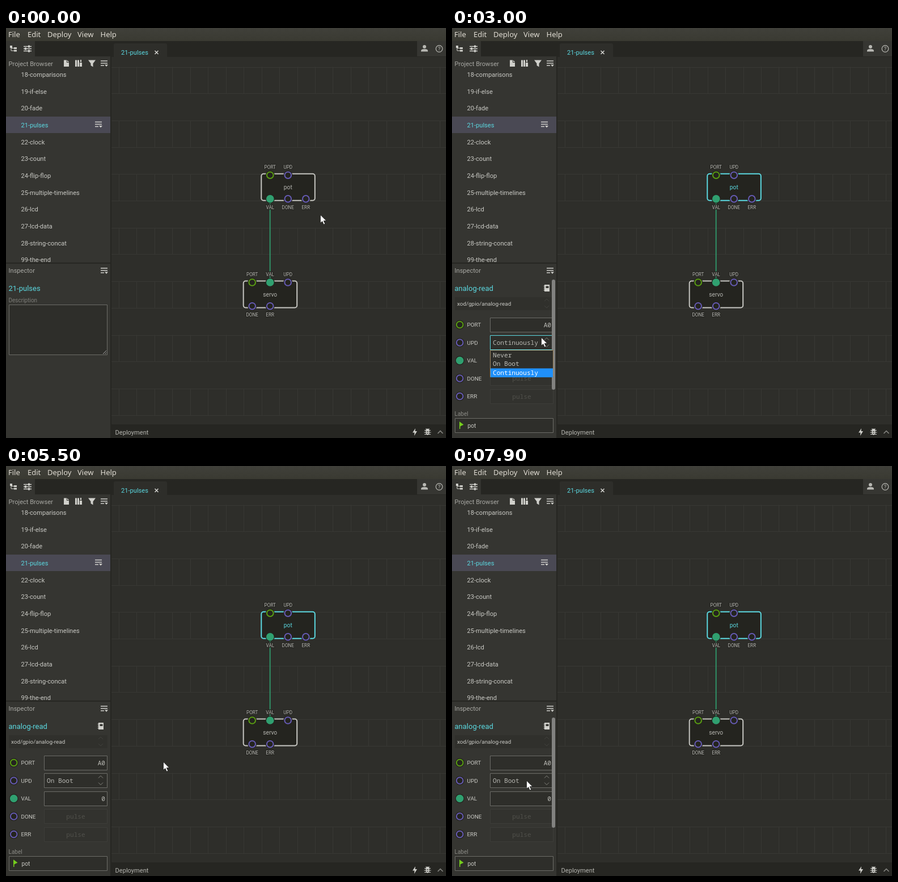
An HTML page with a canvas for the animation above (8 s loop, 776 by 722 pixels).

```html
<!DOCTYPE html>
<html lang="en">
<head>
<meta charset="utf-8">
<title>Patch editor</title>
<style>
  html, body { margin: 0; height: 100%; overflow: hidden; background: #2e2e2a; }
  canvas { display: block; }
</style>
</head>
<body>
<canvas id="stage" width="776" height="722"></canvas>
<script>
const c = document.getElementById('stage').getContext('2d');
const LOOP = 8000, STEP = 100;
const SANS = 'Roboto, sans-serif', MONO = '"Noto Sans Mono", monospace';
const CYAN = '#5bd8e0', GREEN = '#599d12', PURPLE = '#665bb4', TEAL = '#30a070';
const SIDE = '#353531', DARK = '#262622', BOARD = '#2e2e2a', NODE = '#24241f', TEXT = '#c9c9c4', ICON = '#d0d0cb';

// Pointer path: time, x, y
const path = [
  [100, 554, 329], [400, 544, 303], [700, 522, 267], [1500, 522, 267],
  [1600, 500, 285], [1700, 440, 259], [1800, 386, 270], [1900, 386, 270],
  [2000, 362, 310], [2100, 300, 420], [2200, 258, 496], [2300, 258, 496],
  [2800, 157, 545], [3500, 157, 545], [3700, 147, 571], [3800, 147, 571],
  [4000, 136, 581], [4100, 136, 581], [4200, 131, 585], [4800, 131, 585],
  [4900, 132, 580], [5000, 132, 580], [5300, 277, 521], [5900, 277, 521],
  [6400, 420, 342], [6500, 514, 289], [6700, 514, 289], [6800, 500, 272],
  [7200, 500, 272], [7900, 131, 554]
];

function pointerAt(t) {
  const i = path.findIndex(p => p[0] >= t);
  if (i <= 0) return path[0].slice(1);
  const [t0, x0, y0] = path[i - 1], [t1, x1, y1] = path[i];
  const k = (t - t0) / (t1 - t0);
  return [Math.round(x0 + (x1 - x0) * k), Math.round(y0 + (y1 - y0) * k)];
}

function rect(x, y, w, h, fill) {
  c.fillStyle = fill;
  c.fillRect(x, y, w, h);
}

function text(s, x, y, size = 11.1, color = TEXT, align = 'left', font = SANS, weight = 400) {
  c.font = `${weight} ${size}px ${font}`;
  c.textAlign = align;
  c.fillStyle = color;
  c.fillText(s, x, y);
}

function box(x, y, w, h, fill, stroke) {
  rect(x, y, w, h, fill);
  c.strokeStyle = stroke;
  c.lineWidth = 1;
  c.strokeRect(x + .5, y + .5, w - 1, h - 1);
}

function shape(d, x, y, fill, stroke, width = 1) {
  const p = new Path2D(d);
  c.save();
  c.translate(x, y);
  if (fill) { c.fillStyle = fill; c.fill(p); }
  if (stroke) { c.strokeStyle = stroke; c.lineWidth = width; c.stroke(p); }
  c.restore();
}

function disc(x, y, r, fill, stroke, width = 2) {
  c.beginPath();
  c.arc(x, y, r, 0, 7);
  if (fill) { c.fillStyle = fill; c.fill(); }
  if (stroke) { c.strokeStyle = stroke; c.lineWidth = width; c.stroke(); }
}

function pin(x, y, color) {
  disc(x, y, 8, NODE);
  disc(x, y, 5.8, color === TEAL ? TEAL : NODE, color);
}

function menuIcon(x, y) {
  shape('M0 .5H12M0 4.5H12M0 8.5H6', x, y, null, ICON, 1.4);
  shape('M7 7H13L10 10.5Z', x, y, ICON);
}

function drawIcons() {
  shape('M7 31H11V35H7ZM14 34H19V37H14ZM14 38.5H19V41.5H14Z', 0, 0, ICON);
  shape('M9 34V40H14M9 35.5H14', 0, 0, null, ICON);
  shape('M31 32.5H45M31 36.5H45M31 40.5H45', 0, 0, null, ICON, 1.3);
  shape('M39 30.5H42V34.5H39ZM33 34.5H36V38.5H33ZM39 38.5H42V42.5H39Z', 0, 0, ICON);
  shape('M102 56.500H107V61H111V68H102ZM108 56.500L111 60H108Z', 0, 0, ICON);
  shape('M122 56.500H125V68H122ZM126 56.500H129V68H126ZM130 61H134V68H130ZM131 56H133V60H131Z', 0, 0, ICON);
  shape('M145 56.500H158L153.500 62.500V68.500L149.500 66V62.500Z', 0, 0, ICON);
  menuIcon(167, 57.5);
  menuIcon(167, 422.500);
  menuIcon(157, 165);
  shape('M262.500 40L268.500 46M268.500 40L262.500 46', 0, 0, null, '#d4d4d0', 1.5);
  disc(738, 33, 3, '#b8b8b3');
  shape('M732 41.500V40Q732 37 738 37T744 40V41.500Z', 0, 0, '#b8b8b3');
  disc(764, 36.500, 5.8, null, '#b8b8b3', 1.2);
  text('?', 764, 40, 9.5, '#b8b8b3', 'center');
  shape('M722 705L717 712.500H720.500L720 718L725 710H721.500Z', 0, 0, ICON);
  shape('M740.500 707.500Q743.500 703.500 746.500 707.500V714Q743.500 719.500 740.500 714Z', 0, 0, ICON);
  shape('M738 708.500H749M737.500 712H749.500M738 715.500H749M740.500 705L742 707M746.500 705L745 707', 0, 0, null, ICON);
  shape('M742 710.500H745M742 713.500H745', 0, 0, null, DARK);
  shape('M761.500 714L766 709.500L770.500 714', 0, 0, null, '#858580', 1.7);
}

function drawFrame() {
  rect(0, 0, 776, 722, BOARD);
  // Slot grid
  c.strokeStyle = '#383834';
  c.lineWidth = 1;
  c.beginPath();
  for (let y = 68.5; y < 690; y += 94.4) {
    for (const gy of [y, y + 46.6]) {
      c.moveTo(186, Math.round(gy) + .5);
      c.lineTo(776, Math.round(gy) + .5);
    }
    for (let x = 199.2; x < 776; x += 31.48) {
      c.moveTo(Math.floor(x) + .5, y);
      c.lineTo(Math.floor(x) + .5, y + 47);
    }
  }
  c.stroke();

  const bar = c.createLinearGradient(0, 0, 0, 23);
  bar.addColorStop(0, '#40403a');
  bar.addColorStop(1, '#3a3a32');
  rect(0, 0, 776, 23, bar);
  [['File', 4], ['Edit', 38], ['Deploy', 73], ['View', 126], ['Help', 166.500]]
    .forEach(([s, x]) => text(s, x, 15.5, 13, '#dfdbd2', 'left', '"Noto Sans", sans-serif'));

  rect(186, 23, 590, 28, DARK);
  c.fillStyle = BOARD;
  c.beginPath();
  c.roundRect(190, 27, 94, 24, [3, 3, 0, 0]);
  c.fill();
  text('21-pulses', 203, 47, 11.1, CYAN);
  rect(725, 23, 51, 27, '#363632');

  rect(0, 23, 185, 699, SIDE);
  rect(51, 23, 134, 27, DARK);
  rect(184, 23, 2, 699, DARK);
  text('Project Browser', 4.5, 66.500, 11.1, '#a9a9a4');
  rect(0, 156, 184, 29, '#4a4954');
  ['18-comparisons', '19-if-else', '20-fade', '21-pulses', '22-clock', '23-count', '24-flip-flop',
    '25-multiple-timelines', '26-lcd', '27-lcd-data', '28-string-concat', '99-the-end']
    .forEach((s, i) => text(s, 26.500, 86.2 + i * 29.63, 11.1, i === 3 ? CYAN : TEXT));
  rect(0, 412, 184, 28, SIDE);
  rect(0, 413, 184, 2, DARK);
  text('Inspector', 4.5, 431, 11.1, '#a9a9a4');

  rect(186, 698, 590, 24, DARK);
  text('Deployment', 192.500, 715.5, 11.1, '#b5b5b0');
  drawIcons();
}

function drawNode(x, y, name, color, nameColor, top, bottom) {
  c.fillStyle = NODE;
  c.strokeStyle = color;
  c.lineWidth = 2;
  c.beginPath();
  c.roundRect(x, y, 94.5, 47, 4);
  c.fill();
  c.stroke();
  text(name, x + 47, y + 27.5, 10.2, nameColor, 'center');
  const row = (pins, pinY, labelY) => pins.forEach(([label, tint], i) => {
    const px = x + 15.5 + i * 31.5;
    pin(px, pinY, tint);
    c.font = `8.2px ${SANS}`;
    c.textAlign = 'center';
    c.lineWidth = 3;
    c.lineJoin = 'round';
    c.strokeStyle = '#282824';
    c.strokeText(label, px, labelY);
    text(label, px, labelY, 8.2, '#b5b5b0', 'center');
  });
  row(top, y + 2.5, y - 9);
  row(bottom, y + 44.2, y + 62.5);
}

function drawPatch(hover, selected, linkHover) {
  rect(464.800, 301, 1.700, 147, TEAL);
  drawNode(450.300, 256.700, 'pot', selected ? CYAN : hover ? '#fff' : '#c4c4bf',
    selected ? CYAN : hover ? '#eee' : '#b5b5b0',
    [['PORT', GREEN], ['UPD', PURPLE]], [['VAL', TEAL], ['DONE', PURPLE], ['ERR', PURPLE]]);
  drawNode(418.700, 445.500, 'servo', '#c4c4bf', '#b5b5b0',
    [['PORT', GREEN], ['VAL', TEAL], ['UPD', PURPLE]], [['DONE', PURPLE], ['ERR', PURPLE]]);
  if (linkHover) {
    rect(464.700, 301, 2, 147, '#a5d5c2');
    disc(465.700, 301, 3, '#a5d5c2');
    disc(465.700, 448, 3, '#a5d5c2');
  }
}

function drawPatchPanel() {
  text('21-pulses', 4.5, 462.500, 13, CYAN);
  text('Description', 4.5, 483, 10, '#7d7d78');
  box(5, 487, 174, 89, BOARD, '#6c6c67');
  shape('M171 574L177 568M174.500 574L177 571.500', 0, 0, null, '#aaa');
}

function drawNodePanel(value, focus, scroll) {
  text('analog-read', 4.5, 462.500, 13, CYAN);
  shape('M163 452H172V464H163Z', 0, 0, ICON);
  shape('M165.500 454.500H170.500V458H165.500Z', 0, 0, SIDE);
  shape('M161.500 454.500H164M161.500 458H164M161.500 461.500H164', 0, 0, null, ICON);
  rect(5, 474, 174, 23, '#30302c');
  text('xod/gpio/analog-read', 9, 488.500, 9.9);
  const arrows = (y, tint) =>
    shape('M163 -4L167 -8L171 -4M163 4L167 8L171 4', 0, y, null, tint);
  arrows(485, '#41413d');

  [['PORT', GREEN, 'A0'], ['UPD', PURPLE], ['VAL', TEAL, '0'], ['DONE', PURPLE], ['ERR', PURPLE]]
    .forEach(([label, tint, val], i) => {
      const y = 522.500 + i * 31.5, top = Math.round(y - 13), off = i > 2;
      pin(13.700, y, tint);
      text(label, 26.500, y + 3.7, 9.9);
      const edge = i === 1 && focus ? CYAN : off ? '#3d3d39' : '#6c6c67';
      box(67, top, 112, 26, off ? '#32322e' : BOARD, edge);
      if (val) text(val, 175, y + 4, 11.1, '#b9b9b4', 'right', MONO);
      if (off) text('pulse', 123, y + 4, 11.1, '#50504b', 'center', MONO);
    });
  text(value, 72, 558, 11.1, '#b9b9b4', 'left', MONO);
  arrows(553.500, '#85857f');

  text('Label', 4.5, 683, 10, '#8a8a85');
  box(5, 687, 174, 26, BOARD, '#6c6c67');
  shape('M13 693L20.500 698.500L14.500 701.500V706H13Z', 0, 0, '#75cc1d');
  text('pot', 27.500, 703.500, 10.2);
  if (scroll) {
    c.fillStyle = '#828280';
    c.beginPath();
    c.roundRect(176, 443, 6, 194, 3);
    c.fill();
  }
}

function drawOptions(active) {
  box(67, 567, 112, 48, BOARD, '#a18a65');
  ['Never', 'On Boot', 'Continuously'].forEach((s, i) => {
    if (i === active) rect(68, 568 + i * 15.7, 110, 15.7, '#2090fa');
    text(s, 72, 579.500 + i * 15.8, 11.1, i === active ? '#fff' : '#c0c0bb', 'left', MONO);
  });
}

function drawTooltip(x, y) {
  c.save();
  c.shadowColor = 'rgba(0,0,0,.3)';
  c.shadowBlur = 4;
  c.fillStyle = '#262622';
  c.beginPath();
  c.roundRect(x + 8, y + 7, 121, 40, 2);
  c.fill();
  c.restore();
  text('pot', x + 16, y + 23, 11.1, '#e8e8e4', 'left', SANS, 500);
  text('xod/gpio/analog-read', x + 16, y + 37.5, 11, '#b5b5b0');
}

function draw(time) {
  const t = Math.floor(time % LOOP / STEP) * STEP;
  const within = (a, b) => t >= a && t < b;
  const [x, y] = pointerAt(t);
  const selected = within(1100, 5600) || t >= 7200;
  const open = within(3000, 4600);

  drawFrame();
  drawPatch(within(500, 1100) || within(6500, 7200), selected, t === 6400);
  if (selected) drawNodePanel(t < 4600 ? 'Continuously' : 'On Boot', open, x < 184);
  else drawPatchPanel();
  if (open) drawOptions(t < 3700 ? 2 : t < 3900 ? 0 : 1);
  if (within(1000, 1200) || within(7100, 7300)) drawTooltip(x, y);
  shape('M.5 0V14.500L3.800 11.500L6.300 17L8.800 16L6.300 10.600H11Z', x, y, '#fff', '#1a1a18', .8);
}

function tick(now) {
  draw(now);
  requestAnimationFrame(tick);
}
requestAnimationFrame(tick);
</script>
</body>
</html>
```
